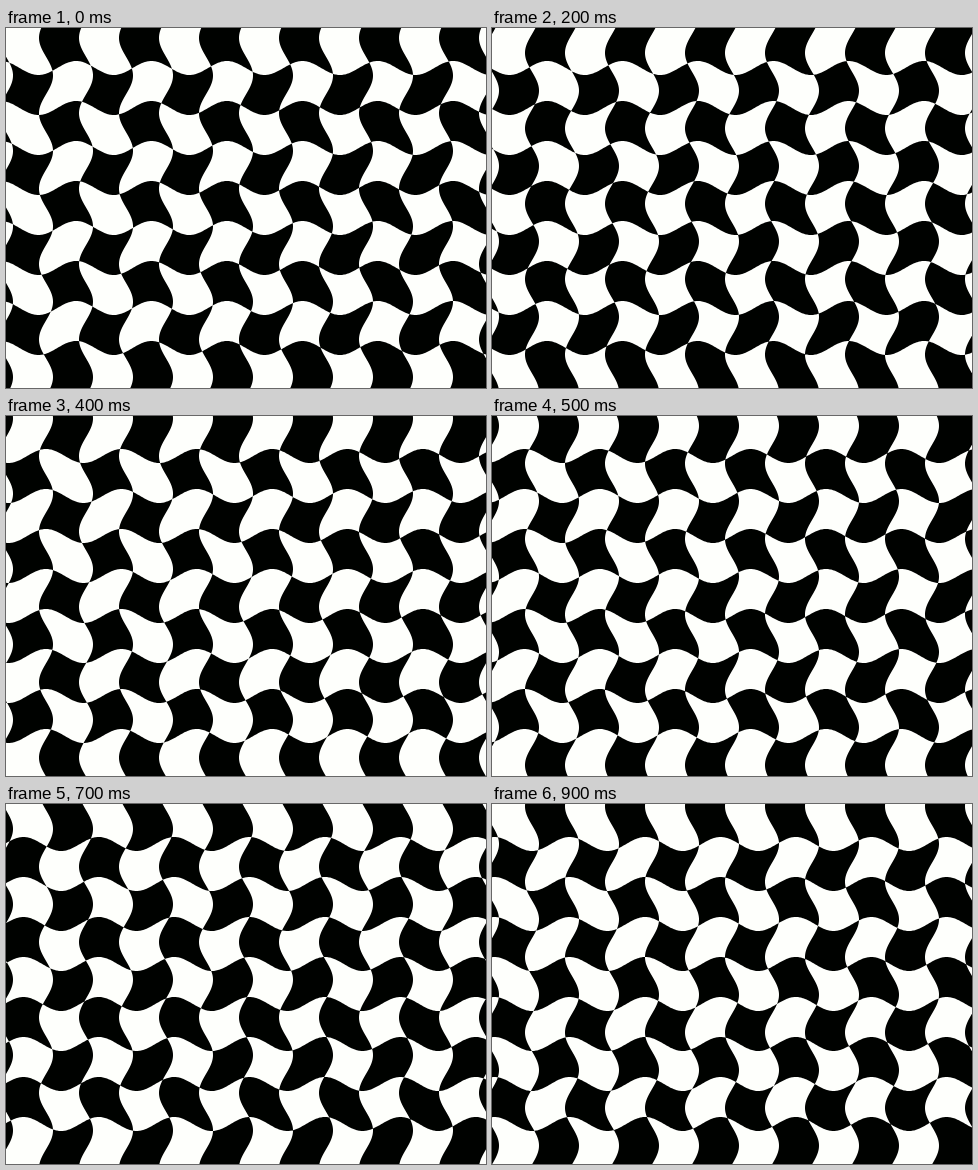
Recreate the animation shown at these times as an HTML page with a canvas. Size 480x360 px, loop 1 s.

```html
<!DOCTYPE html>
<html lang="en">
<head>
<meta charset="utf-8">
<title>Wavy checkerboard</title>
<style>
  html, body { margin: 0; width: 100%; height: 100%; overflow: hidden; background: #fefffc; }
  canvas { display: block; }
</style>
</head>
<body>
<canvas id="stage" width="480" height="360"></canvas>
<script>
const W = 480, H = 360;
const CELL = 40, AMP = 7, SCALE = 12;
const STEPS = 10, STEP_MS = 100;
const LIGHT = '#fefffc', DARK = '#000200';
const ctx = document.getElementById('stage').getContext('2d');

// Closed band between two parallel wavy lines; add(op, along, across) places a point.
function band(start, length, phase, add) {
  const wave = s => start + AMP * Math.cos((s - CELL) / SCALE + phase);
  let first = true;
  const point = (s, across) => {
    add(first ? 'moveTo' : 'lineTo', s, across);
    first = false;
  };
  for (let s = -2; s <= length + 2; s++) point(s, wave(s));
  for (let s = length + 2; s >= -2; s--) point(s, wave(s) + CELL);
  ctx.closePath();
}

function draw(step) {
  const angle = 2 * Math.PI * (step + 1) / STEPS;
  ctx.fillStyle = LIGHT;
  ctx.fillRect(0, 0, W, H);
  ctx.beginPath();
  for (let x = -CELL; x < W + CELL; x += 2 * CELL) {
    band(x, H, -angle, (op, s, across) => ctx[op](across, s));
  }
  // The top and bottom rows run straight off the stage.
  for (let y = CELL; y < H - CELL; y += 2 * CELL) {
    band(y, W, angle, (op, s, across) => ctx[op](s, across));
  }
  // Even-odd filling turns the crossing bands into a checkerboard.
  ctx.fillStyle = DARK;
  ctx.fill('evenodd');
}

const begin = performance.now();
let shown = -1;

function tick() {
  const step = Math.floor((performance.now() - begin) / STEP_MS) % STEPS;
  if (step !== shown) draw(shown = step);
  requestAnimationFrame(tick);
}
tick();
</script>
</body>
</html>
```
